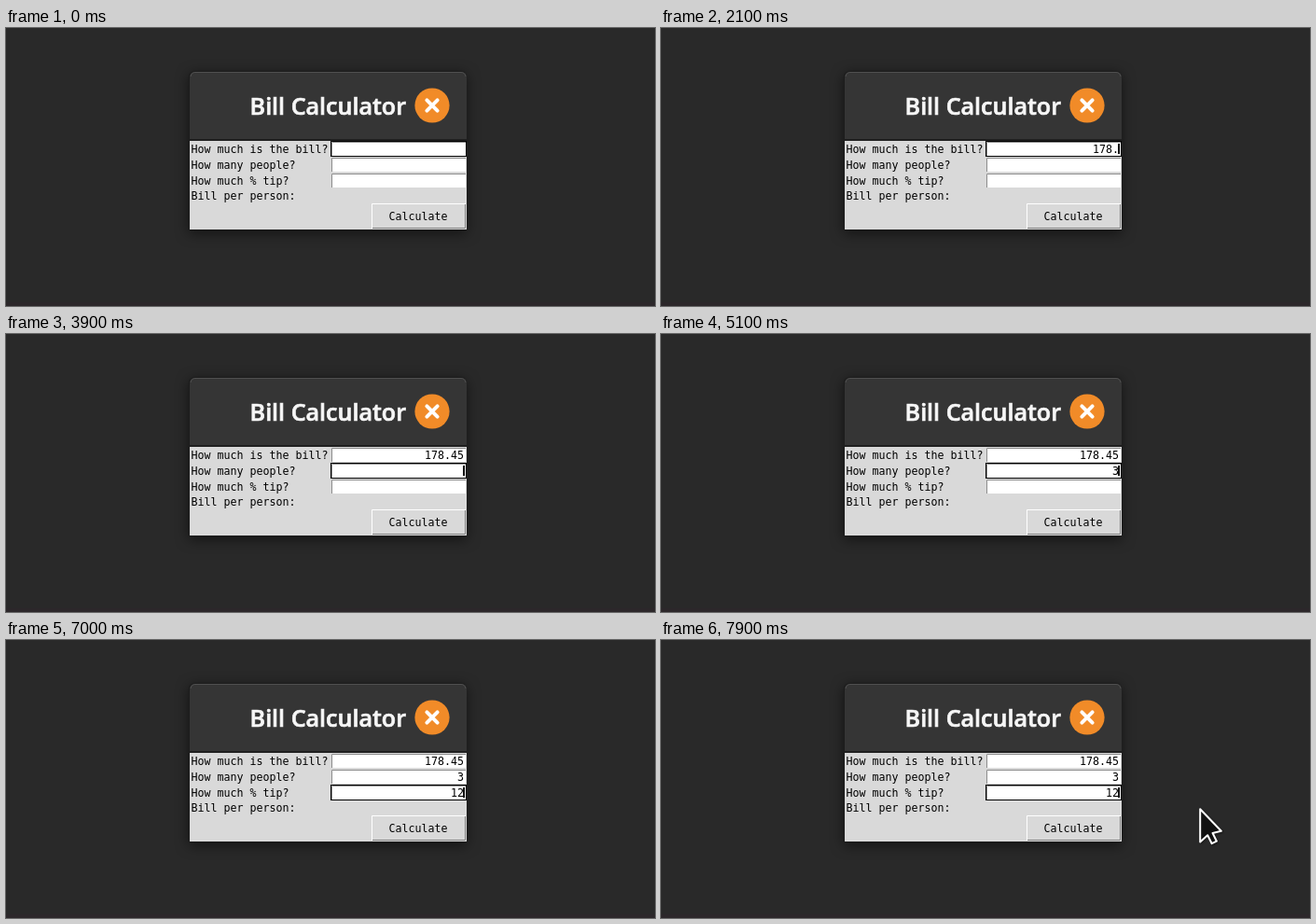
Write an HTML page that moves like this. It is 696 px wide and 298 px high and loops after 8 s.

```html
<!DOCTYPE html>
<html lang="en">
<head>
<meta charset="utf-8">
<title>Bill Calculator</title>
<style>
  html, body { margin: 0; width: 100%; height: 100%; overflow: hidden; background: #292929; }
  svg { display: block; }
  text { white-space: pre; }
  .mono { font: 11.63px "DejaVu Sans Mono", "Liberation Mono", monospace; fill: #000; }
  .title { font: 600 25.1px "Open Sans", "Noto Sans", sans-serif; fill: #f6f6f6; stroke: #f6f6f6; stroke-width: .7; }
  .window { filter: drop-shadow(0 3px 7px rgba(0, 0, 0, .55)); }
  .edge { fill: none; stroke-width: 1; }
</style>
</head>
<body>
<svg width="696" height="298" viewBox="0 0 696 298">
  <rect width="696" height="298" fill="#292929"/>
  <rect y="294" width="696" height="4" fill="#2c272a"/>

  <g class="window">
    <path d="M196 217V53q0-7 7-7H488q6 0 6 7V217z" fill="#1c1c1c"/>
    <path d="M197 120V53q0-6 6-6H488q6 0 6 6V120z" fill="#353535"/>
    <path class="edge" d="M198 52q1-4.500 5-4.500H488q4 0 5 4.500" stroke="#505050"/>
    <rect x="197" y="119" width="297" height="2" fill="#1f1f1f"/>
    <rect x="197" y="121" width="297" height="95" fill="#d9d9d9"/>
  </g>

  <text class="title" x="345.300" y="92.700" text-anchor="middle">Bill Calculator</text>
  <circle cx="457" cy="83" r="18.600" fill="#f18b28"/>
  <path d="M451.400 77.400l11.200 11.200m0-11.200l-11.200 11.200" stroke="#fff" stroke-width="4" stroke-linecap="round"/>

  <g class="mono">
    <text x="198.600" y="134">How much is the bill?</text>
    <text x="198.600" y="151">How many people?</text>
    <text x="198.600" y="168">How much % tip?</text>
    <text x="198.600" y="184">Bill per person:</text>
    <text x="410.500" y="206">Calculate</text>
  </g>
  <path class="edge" d="M392.500 215V188.500H493" stroke="#fff"/>
  <path class="edge" d="M393 214.500H492.500V189" stroke="#828282"/>

  <g id="fields"></g>
  <rect id="caret" x="490" width="2" height="11"/>
  <path id="pointer" d="M1.200 2.200V37.600L9.200 30.200L13.700 39.200L18.900 36.700L14.600 28L23.800 25.800Z"
        fill="#111" stroke="#fff" stroke-width="2" stroke-linejoin="round"
        style="filter: drop-shadow(1px 1px 1px rgba(0, 0, 0, .45))"/>
</svg>
<script>
const LOOP = 8000, TOP = 121, ROW = 17;
const $ = id => document.getElementById(id);

// Each list holds [start time, value]; a value lasts until the next one.
const typed = [
  [[0, ""], [700, "1"], [1300, "17"], [1500, "178"], [2100, "178."], [2800, "178.4"], [3000, "178.45"]],
  [[0, ""], [5100, "3"]],
  [[0, ""], [6400, "1"], [6500, "12"]]
];
const focus = [[0, 0], [3900, 1], [5700, 2]];
const blinks = [200, 800, 1100, 1700, 2100, 2600, 2900, 5500, 5700, 6300, 7000, 7200, 7500];
const pointerAt = [[0, null], [7700, [634, 171]], [7800, [606, 175]], [7900, [577, 179]]];

const valueAt = (steps, t) => steps.findLast(([start]) => start <= t)[1];

$("fields").innerHTML = typed.map((_, i) => `<g transform="translate(348 ${TOP + i * ROW})">
  <rect class="ring" width="146" height="17"/>
  <rect x="1" y="1" width="144" height="15" fill="#fff"/>
  <path class="edge" d="M1.500 16V1.500H145" stroke="#8c8c8c"/>
  <text class="mono" x="143" y="13" text-anchor="end"></text>
</g>`).join("");
const rings = document.querySelectorAll(".ring");
const entries = document.querySelectorAll("#fields text");

function draw() {
  const t = performance.now() % LOOP;
  const active = valueAt(focus, t);
  typed.forEach((steps, i) => {
    entries[i].textContent = valueAt(steps, t);
    rings[i].setAttribute("fill", i === active ? "#000" : "#d9d9d9");
  });

  const lit = blinks.filter(time => time <= t).length % 2;
  $("caret").setAttribute("y", TOP + 3 + active * ROW);
  $("caret").setAttribute("visibility", lit ? "visible" : "hidden");

  const spot = valueAt(pointerAt, t);
  $("pointer").setAttribute("visibility", spot ? "visible" : "hidden");
  if (spot) $("pointer").setAttribute("transform", `translate(${spot})`);
  requestAnimationFrame(draw);
}
draw();
</script>
</body>
</html>
```
